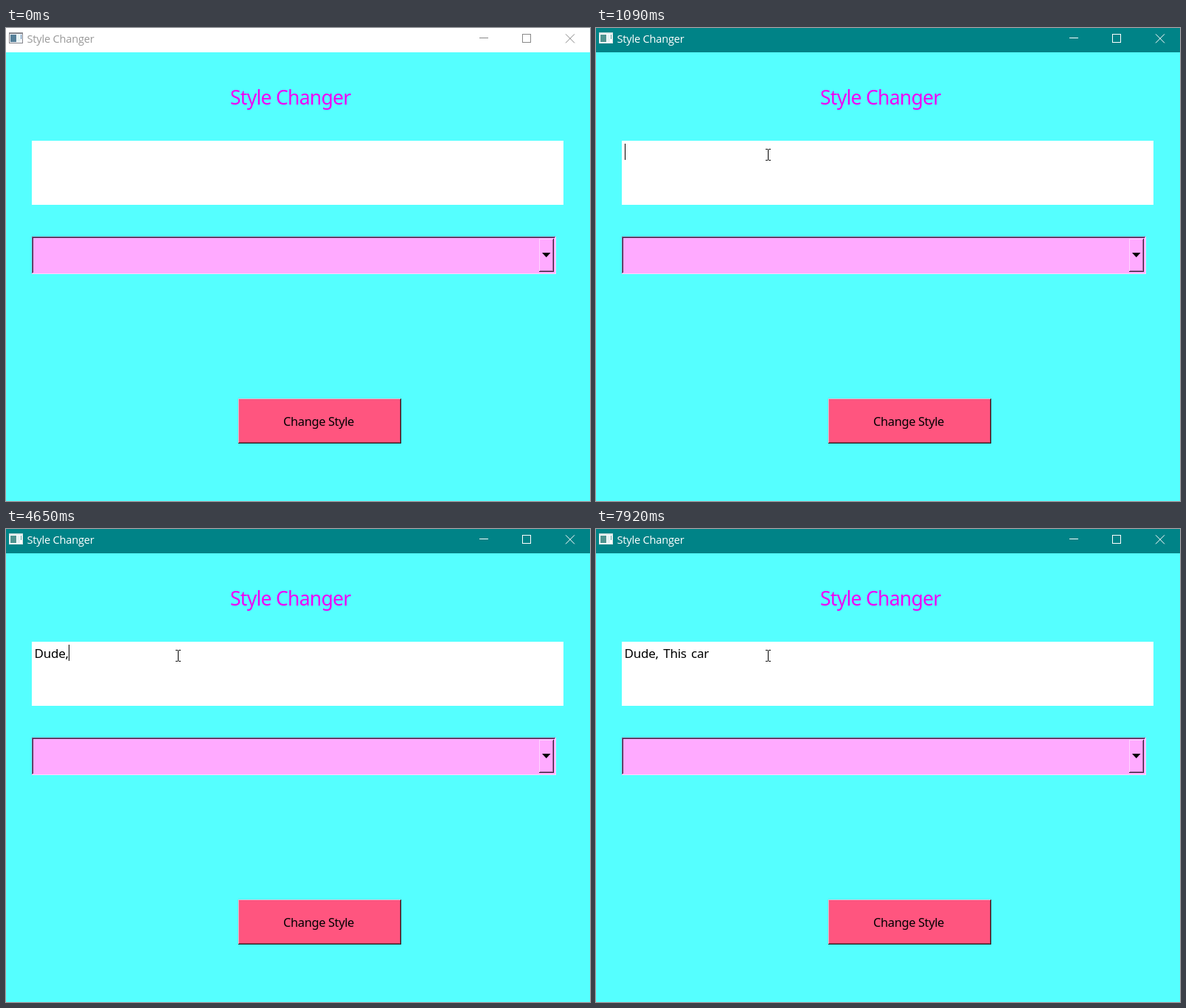
Recreate the animation shown at these times as an HTML page. Size 792 by 642 pixels, loop 8 s.

```html
<!DOCTYPE html>
<html lang="en">
<head>
<meta charset="utf-8">
<title>Style Changer</title>
<style>
  html, body { margin: 0; width: 100%; height: 100%; overflow: hidden; background: #55ffff; }
  svg { display: block; width: 792px; height: 642px; }
  text { font-family: "Noto Sans", "Open Sans", sans-serif; white-space: pre; }
  .crisp { shape-rendering: crispEdges; }
  #caption { font: 14.6px "Open Sans", "Noto Sans", sans-serif; letter-spacing: -.2px; }
  #heading { font-size: 26.5px; letter-spacing: -.72px; fill: #f000f4; }
  #typed { font-size: 17px; letter-spacing: -.25px; word-spacing: 2.2px; }
  #label { font-size: 16.4px; letter-spacing: -.35px; }
</style>
</head>
<body>
<svg viewBox="0 0 792 642" xmlns="http://www.w3.org/2000/svg">
  <rect width="792" height="642" fill="#55ffff"/>

  <!-- title bar -->
  <rect id="bar" width="792" height="33"/>
  <g class="crisp">
    <rect id="iconFrame" x="4" y="6" width="19" height="15"/>
    <rect id="iconBody" x="5" y="8" width="17" height="12"/>
    <rect id="iconLeft" x="6" y="9" width="8" height="10"/>
    <rect x="15" y="9" width="4" height="10" fill="#e4f2f4"/>
    <rect id="iconRight" x="20" y="9" width="1" height="6"/>
  </g>
  <text id="caption" x="28.5" y="20">Style Changer</text>
  <g id="controls" fill="none">
    <path class="crisp" d="M642 13.5h12M700.5 8.5h11v11h-11z"/>
    <path d="M759 8.3l12 12M771 8.3l-12 12"/>
  </g>

  <text id="heading" x="304" y="104">Style Changer</text>

  <!-- text field -->
  <rect x="35" y="153" width="721" height="87" fill="#fff"/>
  <text id="typed" x="38.6" y="175"></text>
  <rect id="caret" class="crisp" y="157" width="1" height="22"/>

  <!-- drop-down -->
  <g class="crisp">
    <rect x="35" y="283" width="711" height="51" fill="#ffaaff"/>
    <path d="M35 283h710v1h-709v49h-1z" fill="#8a5a8f"/>
    <path d="M36 284h708v1h-707v47h-1z" fill="#3a2a42"/>
    <path d="M745 283h1v51h-711v-1h710z" fill="#ffd8ff"/>
    <path d="M723 286h20v1h-19v43h-1z" fill="#ffd4ff"/>
    <path d="M742 286h1v45h-20v-1h19z" fill="#2c1c30"/>
    <path d="M741 287h1v43h-18v-1h17z" fill="#aa70aa"/>
  </g>
  <path d="M727 305h11.5l-5.75 6.2z"/>

  <!-- push button -->
  <g class="crisp">
    <rect x="315" y="503" width="221" height="61" fill="#ff557f"/>
    <path d="M315 503h220v1h-219v59h-1z" fill="#ffa0b8"/>
    <path d="M535 503h1v61h-221v-1h220z" fill="#222"/>
    <path d="M534 504h1v59h-219v-1h218z" fill="#a83854"/>
  </g>
  <text id="label" x="376" y="540">Change Style</text>

  <!-- mouse -->
  <g id="arrow">
    <path d="M.5 .5v16l3.7-3.6 2.4 5.6 2.4-1-2.4-5.5h5.2z" fill="#fff" stroke="#000"/>
  </g>
  <path id="beam" class="crisp" d="M-3 -8h3v1h1v-1h3v1h-3v14h3v1h-3v-1h-1v1h-3v-1h3v-14h-3z"/>
  <circle id="press" cx="231" cy="171" r="15" fill="#ff0" fill-opacity=".5"/>
</svg>
<script>
const LOOP = 8000, ACTIVE = 1090;
const MESSAGE = "Dude, This car";
const KEYS = [2560, 3180, 3570, 3860, 4650, 4890, 5280, 5670, 6130, 6280, 6360, 6750, 7290, 7450];
const CARET_X = [39, 51, 61, 71, 80, 85, 91, 102, 112, 116, 125, 130, 138, 147, 153];
const CARET_ON = [ACTIVE, 2100, ...KEYS];
const CARET_OFF = [0, 1550, 2640, 3710, 4180, 4730, 5820, 6830, 7370, 7920];
const MOVE = { start: 140, end: 690, steps: 7, from: [718, 622], to: [233, 162] };

const el = id => document.getElementById(id);
const paint = (id, attrs) => {
  for (const name in attrs) el(id).setAttribute(name, attrs[name]);
};
const show = (id, on) => paint(id, { visibility: on ? "visible" : "hidden" });
const latest = (times, t) => Math.max(...times.filter(v => v <= t));

function drawBar(active) {
  paint("bar", { fill: active ? "#008387" : "#fff" });
  paint("caption", { fill: active ? "#fff" : "#999" });
  paint("controls", { stroke: active ? "#fff" : "#888" });
  paint("iconFrame", { fill: active ? "#d8e4e4" : "#85868c" });
  paint("iconBody", { fill: active ? "#fff" : "#f4f6fa" });
  paint("iconLeft", { fill: active ? "#4f9490" : "#557f98" });
  paint("iconRight", { fill: active ? "#4fa09c" : "#5c8cb4" });
}

function mouseAt(t) {
  if (t >= 920) return [233, 172];
  if (t >= 840) return [233, 167];
  const raw = (t - MOVE.start) / (MOVE.end - MOVE.start);
  const u = Math.min(1, Math.floor(raw * MOVE.steps + 1e-6) / MOVE.steps);
  const ease = u * u * (3 - 2 * u);
  return MOVE.from.map((a, i) => Math.round(a + (MOVE.to[i] - a) * ease));
}

function drawMouse(t) {
  const [x, y] = mouseAt(t);
  const visible = t >= MOVE.start;
  const overField = x >= 35 && x < 756 && y >= 153 && y < 240;
  for (const id of ["arrow", "beam"]) paint(id, { transform: `translate(${x} ${y})` });
  show("arrow", visible && !overField);
  show("beam", visible && overField);
  show("press", t >= 1000 && t < ACTIVE);
}

function drawText(t) {
  const count = KEYS.filter(k => k <= t).length;
  el("typed").textContent = MESSAGE.slice(0, count);
  paint("caret", { x: CARET_X[count] });
  show("caret", latest(CARET_ON, t) > latest(CARET_OFF, t));
}

function render(t) {
  drawBar(t >= ACTIVE);
  drawText(t);
  drawMouse(t);
}

const begin = performance.now();
function tick() {
  render((performance.now() - begin) % LOOP);
  requestAnimationFrame(tick);
}
render(0);
requestAnimationFrame(tick);
</script>
</body>
</html>
```
